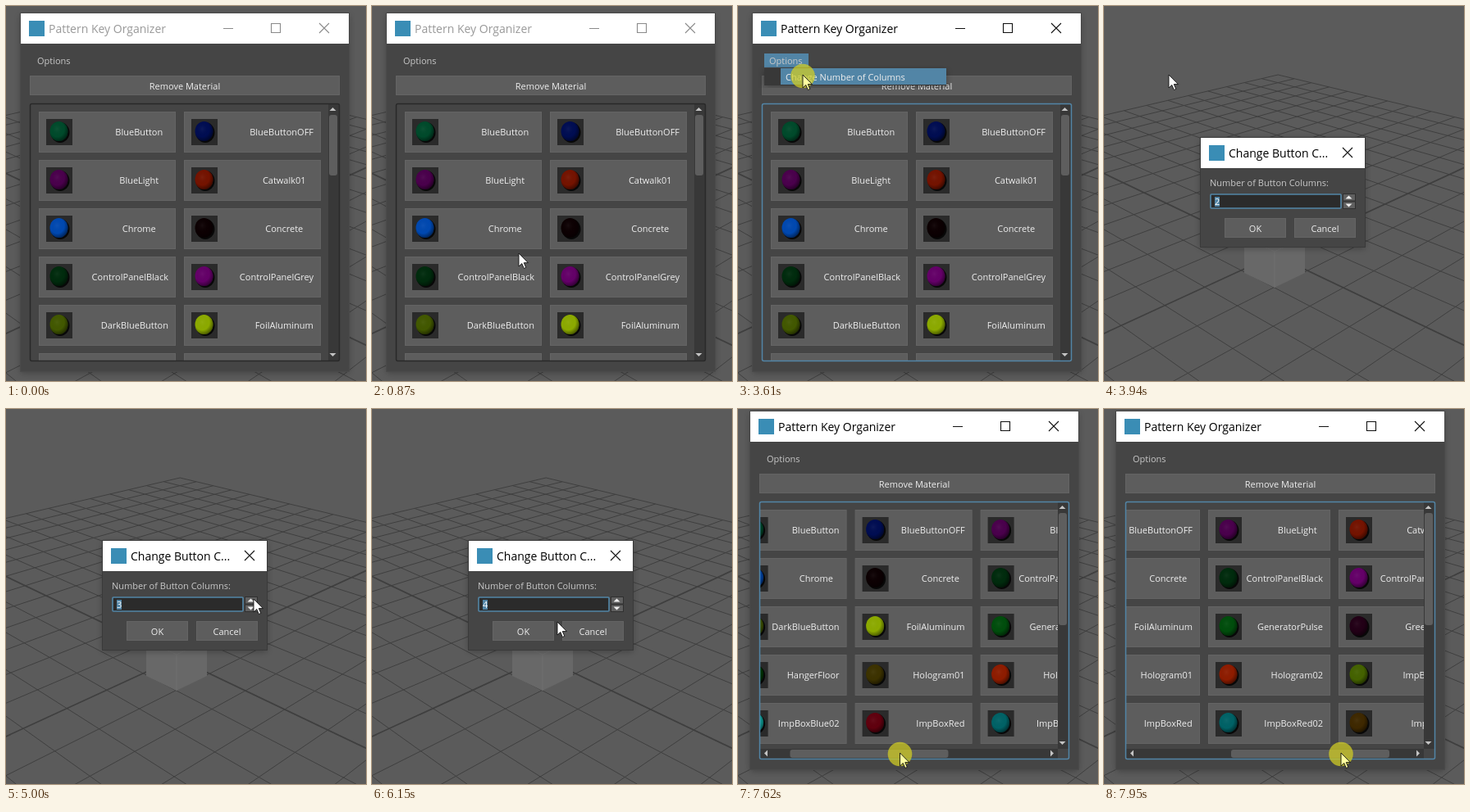
Recreate the animation shown at these times as an HTML page. Size 439 by 458 pixels, loop 8000 ms.

```html
<!DOCTYPE html>
<html lang="en">
<head>
<meta charset="utf-8">
<title>Pattern Key Organizer</title>
<style>
  html, body { margin: 0; width: 100%; height: 100%; overflow: hidden; background: #5b5b5b; }
  svg { display: block; }
  text { font: 11px "Open Sans", "Noto Sans", sans-serif; fill: #eee; }
  .title { font-size: 14px; fill: #000; }
  .soft { fill: #c8c8c8; }
  .mid { text-anchor: middle; }
  .end { text-anchor: end; }
  .btn { fill: #5d5d5d; stroke: #646464; }
  .spin { fill: #606060; stroke: #303030; }
  .line { fill: none; stroke: #111; stroke-width: 1.1; }
  .idle .title { fill: #999; }
  .idle .line { stroke: #8a8a8a; }
</style>
</head>
<body>
<svg id="stage" width="439" height="458" viewBox="0 0 439 458">
  <defs>
    <radialGradient id="shade" cx=".4" cy=".38" r=".66">
      <stop offset="0" stop-color="#fff" stop-opacity=".05"/>
      <stop offset=".6" stop-color="#000" stop-opacity="0"/>
      <stop offset="1" stop-color="#000" stop-opacity=".5"/>
    </radialGradient>
    <filter id="drop" x="-10%" y="-10%" width="120%" height="120%">
      <feDropShadow dx="0" dy="2" stdDeviation="4" flood-opacity=".3"/>
    </filter>
  </defs>
</svg>
<script>
const LOOP = 8000;
const BLUE = '#5285a6';
const stage = document.getElementById('stage');
const $ = id => document.getElementById(id);

const materials = [
  ['BlueButton', '#004a2b'], ['BlueButtonOFF', '#000d52'], ['BlueLight', '#4a004c'], ['Catwalk01', '#741300'],
  ['Chrome', '#0048b0'], ['Concrete', '#0c0002'], ['ControlPanelBlack', '#002b0d'], ['ControlPanelGrey', '#640068'],
  ['DarkBlueButton', '#425800'], ['FoilAluminum', '#8caa00'], ['GeneratorPulse', '#004d0c'], ['GreenLight', '#220016'],
  ['HangerFloor', '#003a05'], ['Hologram01', '#3c3200'], ['Hologram02', '#8e1c00'], ['ImpBoxBlue', '#446200'],
  ['ImpBoxBlue02', '#10a8a0'], ['ImpBoxRed', '#60000e'], ['ImpBoxRed02', '#006266'], ['ImpGrid', '#3e2800']
];

const rect = (x, y, w, h, attrs = '') => `<rect x="${x}" y="${y}" width="${w}" height="${h}" ${attrs}/>`;
const text = (x, y, str, cls = '') => `<text x="${x}" y="${y}" class="${cls}">${str}</text>`;
const path = (d, attrs) => `<path d="${d}" ${attrs}/>`;
const button = (x, y, w, h, label, attrs = '') =>
  rect(x + .5, y + .5, w - 1, h - 1, `class="btn" ${attrs}`) + text(x + w / 2, y + h / 2 + 5, label, 'mid');
const arrow = (x, y, turn, size = 4, fill = '#c4c4c4') =>
  path(`M${-size} ${size / 2}L0 ${-size / 2}L${size} ${size / 2}Z`, `fill="${fill}" transform="translate(${x} ${y}) rotate(${turn})"`);
const cross = (x, y) => path(`M${x - 6} ${y - 6}l12 12m0 -12l-12 12`, 'class="line"');

// Ground plane: 24 x 24 cells in perspective, seen along the diagonal, with a unit cube at the origin.
function ground() {
  const k = .0411, horizon = -139, drop = 443, spread = 38.8, yaw = .009;
  const point = (i, j) => {
    const depth = i + j + yaw * (i - j), side = i - j - yaw * (i + j);
    const w = 1 - k * depth;
    return `${(208 + spread * side / w).toFixed(1)} ${(horizon + drop / w).toFixed(1)}`;
  };
  let out = '';
  for (let i = -12; i <= 12; i++) {
    const far = Math.min(12, .9 / k - i);
    const style = `stroke="#3f3f3f" stroke-width="${i ? 1 : 1.8}"`;
    out += path(`M${point(i, -12)}L${point(i, far)}`, style) + path(`M${point(-12, i)}L${point(far, i)}`, style);
  }
  return out + path('M171 280L208 264L245 280V326L208 344L171 326Z', 'fill="#686868"') +
    path('M171 282L208 300L245 282M208 300V344', 'fill="none" stroke="#6e6e6e"');
}

function cell([name, color], x, y, w) {
  return `<g class="cell" data-x="${x}" data-y="${y}" data-w="${w}">` +
    rect(x + .5, y + .5, w - 1, 49, 'class="btn"') + rect(x + 9, y + 9, 32, 32, 'fill="#2a2a2a"') +
    `<ellipse cx="${x + 26}" cy="${y + 25.5}" rx="11.5" ry="12.5" fill="#080808"/>` +
    [color, 'url(#shade)'].map(f => `<ellipse cx="${x + 24.5}" cy="${y + 24}" rx="11" ry="12" fill="${f}"/>`).join('') +
    text(0, y + 29, name) + '</g>';
}

function materialWindow(id, widths, barEnd, thumb, wide) {
  const starts = widths.map((w, c) => 40 + widths.slice(0, c).reduce((a, b) => a + b + 10, 0));
  const cells = materials.map((m, n) => {
    const c = n % widths.length, r = Math.floor(n / widths.length);
    return r < 6 ? cell(m, starts[c], 129 + 59 * r, widths[c]) : '';
  }).join('');
  return `<g id="${id}"><g id="${id}Chrome">` +
    rect(18, 9, 400, 437, 'fill="#444" filter="url(#drop)"') + rect(17.5, 8.5, 401, 438, 'fill="none" stroke="#4a4a4a"') +
    rect(18, 9, 400, 37, 'fill="#fff"') + rect(28, 18, 19, 19, 'fill="#3a8db5"') +
    text(52, 33, 'Pattern Key Organizer', 'title') +
    path('M265 27.5h12M323.5 21.5h11v11h-11z', 'class="line"') + cross(388, 27) +
    rect(32, 58, 54, 17, `id="${id}Menu" fill="${BLUE}"`) + text(38, 71, 'Options', 'soft') +
    button(29, 85, 378, 24, 'Remove Material', `id="${id}Remove"`) +
    `<clipPath id="${id}Clip">${rect(30, 120, 363, wide ? 300 : 313)}</clipPath>` +
    `<g clip-path="url(#${id}Clip)"><g id="${id}Cells">${cells}</g></g>` +
    rect(393, 120, 13, barEnd - 113, 'fill="#383838"') + rect(394, 133, 10, thumb, 'rx="3" fill="#5e5e5e"') +
    arrow(398.5, 126, 0) + arrow(398.5, barEnd, 180) +
    (wide ? rect(30, 421, 363, 12, 'fill="#383838"') + rect(44, 422, 193, 10, `id="${id}Thumb" rx="3" fill="#5e5e5e"`) +
      arrow(37, 426.5, -90) + arrow(386, 426.5, 90) : '') +
    rect(29.5, 119.5, 377, 314, `id="${id}Frame" rx="2" fill="none" stroke-width="1.5"`) + '</g></g>';
}

const menu = `<g id="menu">${rect(32, 76, 222, 21, 'fill="#373737" filter="url(#drop)"')}` +
  rect(52, 76, 202, 20, 'id="menuItem"') + text(58, 91, 'Change Number of Columns') + '</g>';

const dialog = '<g id="dialog">' +
  rect(118, 161, 200, 133, 'fill="#444" filter="url(#drop)"') + rect(117.5, 160.5, 201, 134, 'fill="none" stroke="#3a3a3a"') +
  rect(118, 161, 200, 37, 'fill="#fff"') + rect(128, 170, 19, 19, 'fill="#3a8db5"') +
  text(152, 185, 'Change Button C...', 'title') + cross(297, 179) +
  text(129, 220, 'Number of Button Columns:', 'soft') +
  rect(130, 230, 159, 17, `rx="1" fill="#2b2b2b" stroke="${BLUE}" stroke-width="1.6"`) +
  rect(135, 233, 6, 12, `fill="${BLUE}"`) + '<text id="value" x="135" y="243" style="fill: #fff"></text>' +
  rect(291.5, 229.5, 15, 8.5, 'class="spin"') + rect(291.5, 239, 15, 8.5, 'class="spin"') +
  arrow(298.5, 233.5, 0, 4, '#eee') + arrow(298.5, 243.5, 180, 4, '#eee') +
  button(147, 259, 75, 24, 'OK', 'id="ok"') + button(232, 259, 75, 24, 'Cancel', 'id="cancel"') + '</g>';

const pointer = '<g id="pointer">' +
  '<circle id="press" cy="1.5" r="14.8" fill="#d2cf22"/>' +
  path('M0 0V16L3.8 12.5L6.3 18.5L8.8 17.4L6.3 11.6H11.4Z', 'id="arrow" stroke="#111" stroke-width=".9"') + '</g>';

stage.insertAdjacentHTML('beforeend', rect(0, 0, 439, 458, 'fill="#5b5b5b"') + ground() +
  materialWindow('first', [167, 167], 426, 74, false) + menu +
  materialWindow('second', [137, 143, 149, 150], 414, 137, true) + dialog + pointer);
$('secondChrome').setAttribute('transform', 'translate(-3 -6)');

// Labels are centred in their slot, or flush right when too long for it.
const cells = [...document.querySelectorAll('.cell')].map(g => {
  const { x, y, w } = g.dataset, label = g.querySelector('text');
  const half = w / 4 - 6, right = +x + +w - 9;
  const fits = label.getComputedTextLength() <= half * 2;
  label.setAttribute('x', fits ? right - half : right);
  label.setAttribute('class', fits ? 'mid' : 'end');
  return { x: +x, y: +y, w: +w, face: g.querySelector('.btn'), second: !!g.closest('#second') };
});

const track = [
  [530, 250, 462], [1330, 68, 52], [1470, 68, 52], [1600, 65, 64], [2870, 65, 64], [3270, 79, 84], [4070, 79, 84],
  [4410, 302, 234], [4650, 302, 234], [5000, 302, 232], [5810, 302, 232], [6150, 226, 260], [6330, 200, 270],
  [6680, 200, 270], [6880, 219, 309], [7350, 175, 420], [7490, 175, 420], [7950, 289, 420]
];
const presses = [[2600, 2670], [3610, 3670], [4470, 4600], [5200, 5330], [6340, 6420], [7490, LOOP]];

const ramp = (t, a, b) => Math.min(1, Math.max(0, (t - a) / (b - a)));
const smooth = p => p * p * (3 - 2 * p);

function pointerAt(t) {
  let [, x, y] = track[0];
  for (let n = 1; n < track.length && t > track[n - 1][0]; n++) {
    const [t0, x0, y0] = track[n - 1], [t1, x1, y1] = track[n];
    const p = smooth(ramp(t, t0, t1));
    x = x0 + (x1 - x0) * p;
    y = y0 + (y1 - y0) * p;
  }
  return [x, y];
}

function showWindow(id, amount, cx, cy) {
  const s = .9 + .1 * amount;
  $(id).setAttribute('opacity', amount);
  $(id).setAttribute('transform', `translate(${cx} ${cy}) scale(${s}) translate(${-cx} ${-cy})`);
}

const show = (id, on) => $(id).setAttribute('visibility', on ? 'visible' : 'hidden');
const tint = (el, on) => { el.style.fill = on ? '#707070' : '#5d5d5d'; };

function render(t) {
  const [px, py] = pointerAt(t);
  const inside = (x, y, w, h) => px >= x && px < x + w && py >= y && py < y + h;
  const active = t >= 2600, pressed = presses.some(([a, b]) => t >= a && t < b);
  showWindow('first', 1 - ramp(t, 3670, 3800), 218, 228);
  showWindow('dialog', ramp(t, 3800, 3930) - ramp(t, 6390, 6480), 218, 228);
  showWindow('second', smooth(ramp(t, 6480, 6680)), 215, 222);

  $('first').setAttribute('class', active ? '' : 'idle');
  $('firstFrame').setAttribute('stroke', active ? BLUE : '#292929');
  $('secondFrame').setAttribute('stroke', BLUE);
  show('firstMenu', t >= 1530);
  show('secondMenu', false);
  show('menu', t >= 2635 && t < 3670);
  $('menuItem').setAttribute('fill', t >= 3000 ? BLUE : '#525252');
  $('value').textContent = t < 4530 ? 2 : t < 5260 ? 3 : 4;

  const scroll = smooth(ramp(t, 7490, 7950));
  $('secondCells').setAttribute('transform', `translate(${-210 * scroll} 0)`);
  $('secondThumb').setAttribute('x', 44 + 114 * scroll);

  tint($('firstRemove'), !active && inside(29, 85, 378, 24));
  tint($('ok'), inside(147, 259, 75, 24));
  tint($('cancel'), inside(232, 259, 75, 24));
  for (const c of cells) {
    const live = c.second ? t >= 6680 && py < 414 && px < 390 : t < 2600 && py < 433;
    tint(c.face, live && inside(c.x - (c.second ? 3 : 0), c.y - (c.second ? 6 : 0), c.w, 50));
  }

  $('pointer').setAttribute('transform', `translate(${px} ${py})`);
  show('pointer', t >= 530);
  $('press').setAttribute('opacity', pressed ? .72 : 0);
  $('arrow').setAttribute('fill', pressed ? '#ffffa0' : '#fff');
}

function frame() {
  render(performance.now() % LOOP);
  requestAnimationFrame(frame);
}
frame();
</script>
</body>
</html>
```
